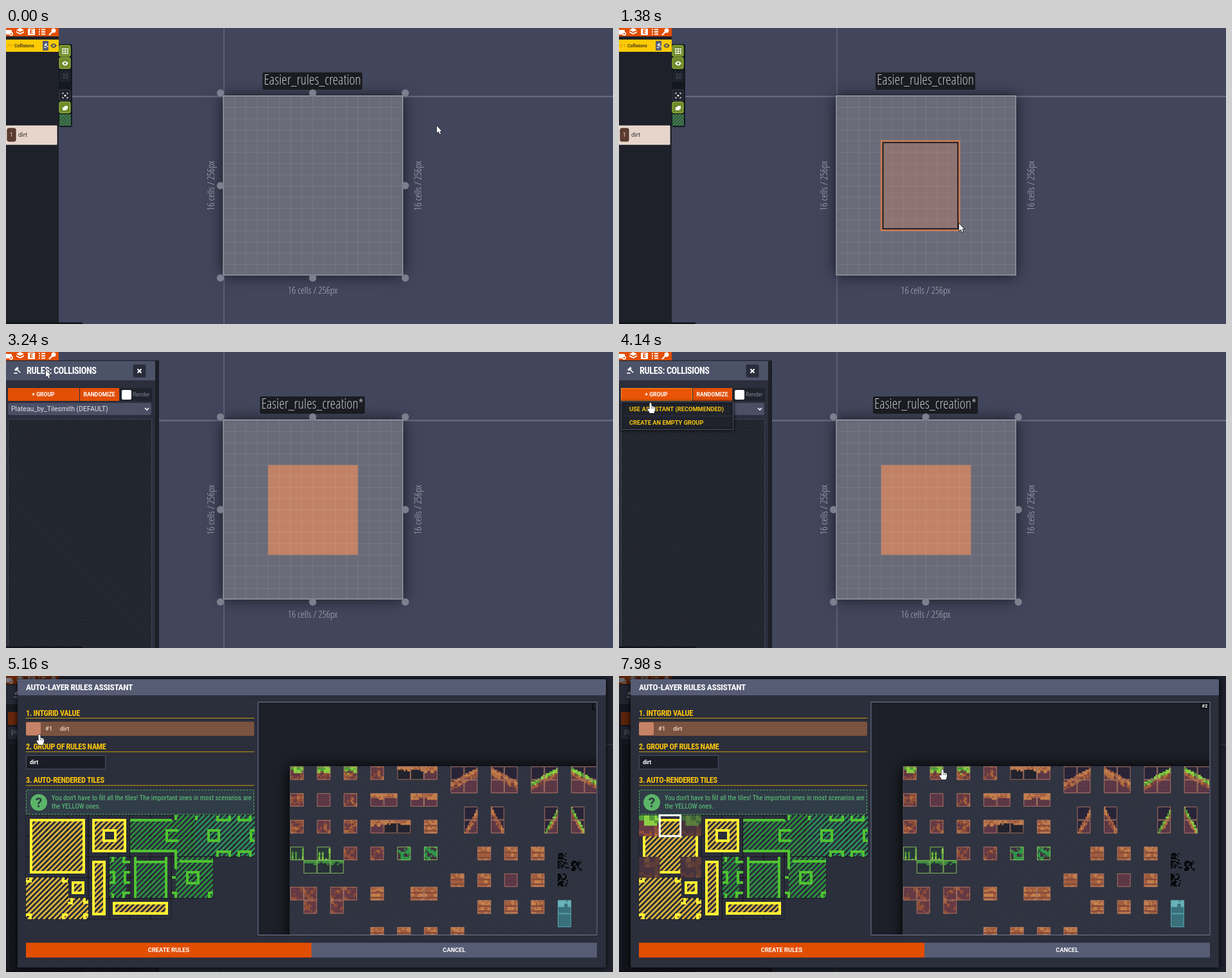
Animation, 944 px wide and 460 px high, one loop 8 s. Source, as an HTML page with a canvas:

```html
<!DOCTYPE html>
<html lang="en">
<head>
<meta charset="utf-8">
<title>Level editor</title>
<style>
html, body { margin: 0; width: 100%; height: 100%; overflow: hidden; background: #42465c }
canvas { display: block }
</style>
</head>
<body>
<canvas id="stage" width="944" height="460"></canvas>
<script>
const W = 944, H = 460, LOOP = 8000, STEP = 60;
const CELL = 279 / 16, LEFT = 338, TOP = 106;
const SLOT = 32.3, TILE = 20.8;
const screen = document.getElementById('stage').getContext('2d');
let ctx = screen;

// ---- drawing helpers ----
function box(x, y, w, h, fill, stroke, radius = 0) {
  ctx.beginPath();
  ctx.roundRect(x, y, w, h, radius);
  if (fill) { ctx.fillStyle = fill; ctx.fill(); }
  if (stroke) { ctx.strokeStyle = stroke; ctx.lineWidth = 1; ctx.stroke(); }
}
function line(path, color, width = 1) {
  ctx.strokeStyle = color;
  ctx.lineWidth = width;
  ctx.stroke(new Path2D(path));
}
function shape(path, color) {
  ctx.fillStyle = color;
  ctx.fill(new Path2D(path));
}
function dot(x, y, r, color) {
  ctx.beginPath();
  ctx.arc(x, y, r, 0, 7);
  ctx.fillStyle = color;
  ctx.fill();
}
function at(x, y, draw, angle = 0) {
  ctx.save();
  ctx.translate(x, y);
  ctx.rotate(angle);
  draw();
  ctx.restore();
}
function hatch(x, y, w, h, color, gap = 6, width = 1, slope = -1) {
  ctx.save();
  ctx.beginPath();
  ctx.rect(x, y, w, h);
  ctx.clip();
  ctx.beginPath();
  const first = Math.floor((slope < 0 ? x + y : x - y - h) / gap) * gap;
  for (let k = first; k < first + w + h + 2 * gap; k += gap) {
    ctx.moveTo(k + slope * y, y);
    ctx.lineTo(k + slope * (y + h), y + h);
  }
  ctx.strokeStyle = color;
  ctx.lineWidth = width;
  ctx.stroke();
  ctx.restore();
}
function layer(draw) {
  const canvas = document.createElement('canvas');
  canvas.width = W;
  canvas.height = H;
  ctx = canvas.getContext('2d');
  draw();
  ctx = screen;
  return canvas;
}

// ---- text ----
const roboto = (size, weight = 400) => `${weight} ${size}px Roboto, sans-serif`;
const faces = {
  label: '"Open Sans Condensed Light", "Open Sans Condensed", "Open Sans"',
  ui: '"Roboto Condensed", Roboto'
};
const condensed = (face, size, weight) => `${weight} condensed ${size}px ${faces[face]}, sans-serif`;
// Use a smaller size where no condensed face is installed.
const shrink = (face, plain) => {
  const widthOf = font => { ctx.font = font; return ctx.measureText('Rules creation').width; };
  return widthOf(condensed(face, 40, 400)) < widthOf(`40px "${plain}", sans-serif`) * .97 ? 1 : .84;
};
const scale = { label: shrink('label', 'Open Sans'), ui: shrink('ui', 'Roboto') };
const narrow = (face, size, weight) => condensed(face, size * scale[face], weight);

function text(s, x, y, font, color, align = 'left', spacing = 0) {
  ctx.font = font;
  ctx.letterSpacing = spacing + 'px';
  ctx.textAlign = align;
  ctx.textBaseline = 'middle';
  ctx.fillStyle = color;
  ctx.fillText(s, x, y);
}
const heading = (s, x, y, size, color) => text(s, x, y, narrow('ui', size, 600), color, 'left', -.03 * size);

// ---- small icons ----
const gavel = (x, y, size, color) => at(x, y, () => {
  ctx.scale(size, size);
  box(-4, -5, 4, 8, color);
  box(0, -2, 8, 2, color);
  ctx.rotate(-Math.PI / 4);
  box(-6, 5, 7, 2, color);
}, Math.PI / 4);

function eye(x, y, color, pupil) {
  at(x, y, () => {
    shape('M-5 0Q0 -7 5 0Q0 7 -5 0Z', color);
    dot(0, 0, 1.8, pupil);
  });
}

// ---- world ----
const world = layer(() => {
  box(0, 0, W, H, '#42465c');
  line('M339 0V460', '#74788a');
  line('M82 106.5H944', '#6d7184', 2);
  ctx.shadowColor = 'rgba(0,0,0,.7)';
  ctx.shadowBlur = 22;
  box(LEFT, TOP, 279, 278, '#696b79');
  ctx.shadowBlur = 0;
  for (let i = 1; i < 16; i++) {
    const d = i * CELL;
    line(`M${LEFT + d} ${TOP}V384M${LEFT} ${TOP + d}H617`, 'rgba(255,255,255,.09)');
  }
  box(LEFT, TOP - .5, 279, 278.5, null, '#b9bac3');
  const size = '16 cells / 256px', font = narrow('label', 15.3, 300), color = '#b0b2bc';
  text(size, 477, 409, font, color, 'center');
  for (const x of [320, 642]) at(x, 245, () => text(size, 0, 0, font, color, 'center'), -Math.PI / 2);
});

function toolbar() {
  box(0, 0, 82, 13, '#e24e06');
  box(-1, 3, 10, 7, '#fff', null, 1);
  dot(8, 9, 3, '#fff');
  dot(8, 9, 1.3, '#e24e06');
  shape('M22 0L28 3L22 6L16 3ZM16 5L22 8L28 5V7L22 10L16 7Z', '#fff');
  box(34, 1, 11, 10, '#fff', null, 1);
  text('E', 39.5, 6.5, roboto(9, 900), '#e24e06', 'center');
  line('M51 2.5H53M55 2.5H61M51 6H53M55 6H61M51 9.5H53M55 9.5H61', '#fff', 2);
  line('M67 11L73 5', '#fff', 2.4);
  dot(74, 4, 3.5, '#fff');
}

const sidebar = layer(() => {
  box(0, 0, 82, H, '#1e2129');
  toolbar();
  box(0, 18, 82, 19, '#fecb05');
  text('F1', 2, 27.5, roboto(7.5), '#dc8f0b');
  text('Collisions', 13, 27.5, roboto(7, 500), '#2b2615');
  box(57, 20, 9, 15, '#565c75', null, 1);
  gavel(62, 27, .55, '#fff');
  eye(74, 27.5, '#4b4e62', '#fecb05');
  box(0, 152, 79, 29, '#e7d4ca', '#f4e9e2');
  box(2, 156, 13, 20, '#5c3b30', '#41291f', 2);
  text('1', 8.5, 166.5, roboto(8.5), '#eed5c8', 'center');
  text('dirt', 19, 166.5, roboto(9.5), '#33302f');

  box(82, 25, 21, 129, '#141820', null, 3);
  for (const y of [27, 46, 115]) box(83, y, 17, 17, '#6f8a2c', '#a8cc3c', 2);
  box(83, 96, 17, 17, '#20232c', '#3a3e4c', 2);
  hatch(83, 66, 17, 18, '#2e323b', 5, 1.5);
  box(83, 134, 18, 18, '#2f5b3e');
  hatch(83, 134, 18, 18, '#4a8054', 5, 1.5);
  line('M87 32.5H97M87 36H97M87 39.5H97M88 31V41M92 31V41M96 31V41', '#fff');
  eye(92, 55, '#fff', '#6f8a2c');
  line('M88 72H97M88 75H97M88 78H97', '#4b505c');
  line('M88 103V101H90M94 101H96V103M96 107V109H94M90 109H88V107', '#fff');
  dot(92, 105, 1.6, '#fff');
  shape('M88 128V123H91V121H96V126H94V128Z', '#fff');
});

// ---- rules panel ----
const panel = layer(() => {
  box(0, 13, 238, 447, '#1c1f28');
  toolbar();
  box(0, 14, 232, 446, '#2b2e3b');
  box(0, 14, 232, 30, '#4c5268');
  gavel(17, 28, .8, '#fff');
  heading('RULES: COLLISIONS', 32, 30, 14.3, '#fff');
  box(197.5, 19.5, 20, 20, '#292c39', '#3c4155', 2);
  line('M204.5 26.5L210.5 32.5M210.5 26.5L204.5 32.5', '#fff', 2);
  box(3, 56, 111, 20, '#e24e06');
  box(115, 56, 61, 20, '#e24e06');
  text('RANDOMIZE', 145, 66.5, roboto(8.6, 600), '#fff', 'center');
  box(177, 56, 50, 20, '#20232c');
  box(180, 59, 15, 15, '#fff', null, 2);
  text('Render', 197, 66.5, roboto(8.5), '#7c8194');
  box(3, 79, 223, 19, '#4a4f65', null, 2);
  text('Plateau_by_Tilesmith (DEFAULT)', 8, 88.5, roboto(10.5), '#dfe1ea');
  line('M216 87L219 90L222 87', '#fff', 1.6);
  box(3.5, 104.5, 223, 360, '#1c1f26', '#3d4254');
  hatch(4, 105, 222, 355, '#2d323c', 5, 1.4, 1);
});

// ---- tiles: each kind maps a pixel and its noise to a colour ----
const noise = (i, j, k) => {
  const v = Math.sin(i * 12.9898 + j * 78.233 + k * 37.719) * 43758.5453;
  return v - Math.floor(v);
};
// Noise in small clumps, so that tiles look like pebbles.
const clumps = (i, j, k) => .65 * noise(i >> 1, j >> 1, k) + .35 * noise(i, j, k);
const NIGHT = '#292438', PLUM = '#5e3846';
const soil = h => h > .72 ? '#b8703f' : h > .42 ? '#934f37' : '#673a44';
const clay = h => h > .5 ? '#c8804c' : '#a65e3d';
const leaf = h => h > .5 ? '#8fd443' : '#539f38';
const slope = (rising, edge) => (i, j, h, w, tall) => {
  const reach = (rising ? w - i : i) / w * tall * (tall > w ? .9 : .55);
  return j < reach ? NIGHT : j < reach + 2.5 ? edge(h) : j < reach + 5 ? soil(h + .2) : PLUM;
};
const kinds = {
  dirt: (i, j, h) => soil(h),
  root: (i, j, h) => soil(h - .2),
  plain: () => PLUM,
  grass: (i, j, h) => j < 1.5 + h * 3 ? leaf(h) : soil(h),
  ledge: (i, j, h) => j < 2 + h * 2 ? clay(h) : PLUM,
  gap: (i, j, h) => j < 1.5 + h ? clay(h) : '#22232d',
  rise: slope(true, clay), fall: slope(false, clay),
  greenRise: slope(true, leaf), greenFall: slope(false, leaf),
  plant: (i, j, h) => noise(i, 3, 1) * 7 < j && i % 2 ? leaf(h) : '#28383a',
  moss: (i, j, h) => j < h * 3 ? '#3d8f3c' : '#283039',
  bush: (i, j, h) => h > .55 ? '#2f9a48' : '#43303f',
  stone: (i, j, h) => j == 3 || j == 6 ? '#8a4d3b' : clay(h),
  ice: (i, j, h) => j < 4 && h > .4 ? '#6cb9bd' : '#3a737d'
};
function paint(kind, x, y, size, cols = 1, rows = 1, seed = 0) {
  const px = size / 8;
  for (let i = 0; i < cols * 8; i++)
    for (let j = 0; j < rows * 8; j++) {
      ctx.fillStyle = kinds[kind](i, j, clumps(i, j, seed), cols * 8, rows * 8);
      ctx.fillRect(x + i * px, y + j * px, px + .3, px + .3);
    }
}
function place(kind, row, columns, cols = 1, rows = 1, border = '#a27262') {
  for (const c of columns) {
    const x = 442 + c * TILE, y = 140.5 + row * TILE;
    paint(kind, x, y, TILE, cols, rows, c + row);
    for (let i = 0; i < cols; i++)
      for (let j = 0; j < rows; j++)
        box(x + i * TILE + .5, y + j * TILE + .5, TILE - 1, TILE - 1, null, border);
  }
}
function tileset() {
  box(392, 41, 527, 361, '#1d2029');
  ctx.save();
  ctx.beginPath();
  ctx.rect(393, 42, 525, 360);
  ctx.clip();
  ctx.shadowColor = '#000';
  ctx.shadowBlur = 20;
  box(441, 140, 520, 300, '#2d303d');
  ctx.shadowBlur = 0;
  hatch(441, 140, 478, 262, '#363b49', 5, 1.2, 1);
  const green = '#86b95b';
  place('grass', 0, [0, 2, 4]);
  place('dirt', 0, [6]);
  place('gap', 0, [8, 9]);
  place('ledge', 0, [10]);
  place('rise', 0, [12], 2, 2);
  place('fall', 0, [15], 2, 2);
  place('greenRise', 0, [18], 2, 2);
  place('greenFall', 0, [21], 2, 2);
  place('dirt', 2, [0, 4]);
  place('plain', 2, [2]);
  place('ledge', 2, [6, 7, 9, 10]);
  place('rise', 3, [13], 1, 2);
  place('fall', 3, [15], 1, 2);
  place('greenRise', 3, [19], 1, 2);
  place('greenFall', 3, [21], 1, 2);
  place('dirt', 4, [0, 2, 4]);
  place('ledge', 4, [6]);
  place('gap', 4, [7, 8]);
  place('stone', 4, [10]);
  place('plant', 6, [0, 2], 1, 1, green);
  place('root', 6, [4, 6]);
  place('bush', 6, [8, 10], 1, 1, green);
  place('stone', 6, [14, 16, 18]);
  place('moss', 7, [1, 2, 3], 1, 1, green);
  place('stone', 8, [12, 14, 18]);
  place('plain', 8, [16]);
  place('root', 9, [0, 1, 3, 4]);
  place('stone', 9, [6, 9, 10]);
  place('root', 10, [1, 3]);
  place('stone', 10, [14, 16, 18]);
  place('ice', 10, [20], 1, 2, '#58a3aa');
  place('stone', 12, [6, 8, 10, 12]);
  ctx.fillStyle = '#07080b';
  for (const [x, y, h] of [[858, 275, 24], [879, 287, 16], [858, 307, 20]])
    for (let i = 0; i < 10; i++)
      for (let j = 0; j < h / 2; j++)
        if (noise(i, j, x + y) > .15 + i * .1) ctx.fillRect(x + i * 2, y + j * 2, 2, 2);
  ctx.restore();
  box(392, 40.5, 527, 362, null, '#757b91');
}

// ---- rule slots ----
function ruleSlots() {
  ctx.strokeStyle = 'rgba(0,0,0,.3)';
  ctx.lineWidth = 1;
  for (let r = 0; r < 5; r++)
    for (let c = 0; c < (r < 2 ? 11 : r < 4 ? 9 : 7); c++)
      ctx.strokeRect(31 + c * SLOT, 216.5 + r * SLOT, SLOT, SLOT);
  const yellow = '#fff133', green = '#50c331', gap = SLOT / 4;
  for (const area of [[39, 224, 82, 81], [136, 224, 49, 48], [136, 289, 17, 81], [104, 321, 16, 16],
    [168, 353, 82, 16], [31, 313, 66, 65], [97, 345, 31, 33]]) hatch(...area, '#dfb83b', gap, 2.7);
  for (const area of [[193, 224, 71, 50], [264, 216, 30, 64], [161, 281, 26, 64], [201, 289, 48, 56],
    [264, 281, 58, 64]]) hatch(...area, '#2d9240', gap, 2.7);
  hatch(294, 216, 93, 64, '#2b9159', gap, 2.7);
  box(152, 240, 18, 16, '#2b2e3b');
  line('M39 224H121V305H39ZM136 224H185V272H136ZM152 240H170V256H152ZM136 289H153V370H136Z' +
    'M104 321H120V337H104ZM168 353H250V369H168Z', yellow, 4);
  line('M31 319H38V313M89 313V319H96M31 371H38V378M89 378V371H96M96 353H102V345' +
    'M122 345V352H128M122 378V371H128', yellow, 4);
  line('M193 224H258M193 272H264V281M268 240H250V256H268M315 240H331V256H315ZM264 216V224M296 217V224' +
    'M329 217V224H348V217M362 217V224H380V217M387 240H381V256H387M329 281V273H348V281M362 281V273H380V281', green, 4);
  line('M166 281V289M166 345V338M183 281V289H193M183 345V337H193M161 305H168V321H161M193 305H185V321H193' +
    'M201 281V345M249 281V345M201 289H249M258 337H264V345M264 272V300M282 305H299V322H282Z' +
    'M258 313H264M270 288H322M316 345V337H322', green, 4);
}

const dialog = layer(() => {
  ctx.shadowColor = '#000';
  ctx.shadowBlur = 8;
  box(18, 5, 915, 448, '#2b2e3b', null, 2);
  ctx.shadowBlur = 0;
  box(18, 5, 915, 25, '#565c74', null, 2);
  heading('AUTO-LAYER RULES ASSISTANT', 31, 18.5, 13.5, '#fff');
  ['1. INTGRID VALUE', '2. GROUP OF RULES NAME', '3. AUTO-RENDERED TILES'].forEach((title, i) => {
    heading(title, 31, 58 + i * 52.3, 12.3, '#fbc50b');
    line(`M31 ${65.5 + i * 52.3}H386`, '#c99f10');
  });
  box(31, 71, 355, 22, '#79533f', null, 2);
  box(31, 72, 23, 20, '#c68368', null, 2);
  text('#1', 61, 82, roboto(9.5, 500), '#f0d9ce');
  text('dirt', 84, 82, roboto(9.5, 500), '#f0d9ce');
  box(31.5, 123.5, 123, 21, '#1b1e27', '#4b5064');
  text('dirt', 37, 134.5, roboto(8.5, 700), '#fff');
  ctx.setLineDash([3, 2]);
  box(31.5, 177, 354, 38, '#303c47', '#53b565', 2);
  ctx.setLineDash([]);
  dot(51, 196.5, 13, '#5bb568');
  text('?', 51, 197.5, roboto(21, 700), '#2e3c43', 'center');
  const note = narrow('ui', 10.6, 400);
  text("You don't have to fill all the tiles! The important ones in most scenarios are", 71, 190, note, '#62cc7c');
  text('the YELLOW ones.', 71, 202.5, note, '#62cc7c');
  ruleSlots();
  tileset();
  box(31, 414.5, 444, 23, '#e24e00');
  box(475, 414.5, 444, 23, '#565c74');
  text('CREATE RULES', 253, 426, roboto(9.3, 600), '#fff', 'center');
  text('CANCEL', 697, 426, roboto(9.3, 600), '#fff', 'center');
});

// ---- motion: time, x, y of the pointer tip ----
const route = [
  [0, 670, 152], [660, 398, 186], [840, 398, 186], [960, 416, 190], [1380, 529, 304], [1620, 540, 305],
  [1680, 540, 305], [2460, 62, 27], [2520, 61, 25], [2700, 62, 28], [3240, 62, 28], [3660, 50, 62],
  [3840, 50, 62], [4140, 49, 79], [4620, 52, 91], [5160, 52, 91], [5280, 57, 104], [5460, 57, 104],
  [5820, 268, 212], [6240, 47, 235], [6300, 47, 235], [6780, 441, 157], [7020, 450, 148], [7080, 450, 148],
  [7380, 77, 232], [7440, 77, 232], [7920, 502, 146], [7980, 503, 145], [LOOP, 503, 145]
];
function pointerAt(t) {
  const n = route.findIndex(key => key[0] > t);
  const [t0, x0, y0] = route[n - 1], [t1, x1, y1] = route[n];
  const u = (t - t0) / (t1 - t0), e = u * u * (3 - 2 * u);
  return [x0 + (x1 - x0) * e, y0 + (y1 - y0) * e];
}
function drawPointer(x, y, hand) {
  at(x, y, () => {
    const path = hand
      ? 'M-1.5 1Q0 -1 1.5 1V5L6 6.2Q7.5 7 7 11L5.5 16H-1L-4.5 10.5Q-4.5 8 -1.5 9.8Z'
      : 'M0 0V11L2.6 8.8L4.5 13L6.2 12.2L4.4 8.2H7.6Z';
    line(path, '#1b1c22', 1.4);
    shape(path, '#fff');
    if (hand) line('M1.5 6V9M3.6 6.5V9M5.4 7V9', '#777');
  });
}

function drawLevel(t, x, y) {
  ctx.drawImage(world, 0, 0);
  const painted = t >= 1680;
  const title = 'Easier_rules_creation' + (painted ? '*' : ''), font = narrow('label', 21.8, 300);
  ctx.font = font;
  ctx.letterSpacing = '0px';
  const w = ctx.measureText(title).width + 4;
  box(476.5 - w / 2, 69, w, 27, '#1b1c21', null, 2);
  text(title, 476.5, 82.5, font, '#c4c6cd', 'center');
  if (painted) {
    box(LEFT + 4 * CELL, TOP + 4 * CELL, 8 * CELL, 8 * CELL, '#c18266');
    for (let i = 1; i < 8; i++) {
      const d = (4 + i) * CELL;
      line(`M${LEFT + d} 176V315M408 ${TOP + d}H547`, 'rgba(255,255,255,.1)');
    }
  }
  const col = Math.floor((x - LEFT) / CELL), row = Math.floor((y - TOP) / CELL);
  if (col >= 0 && col < 16 && row >= 0 && row < 16) {
    const dragging = t >= 960 && !painted, c = dragging ? 4 : col, r = dragging ? 4 : row;
    const left = LEFT + c * CELL, top = TOP + r * CELL - .5;
    const wide = (col - c + 1) * CELL, high = (row - r + 1) * CELL;
    box(left, top, wide, high, 'rgba(205,130,100,.36)');
    ctx.lineWidth = 2.4;
    ctx.strokeStyle = '#2b2326';
    ctx.strokeRect(left + 2.6, top + 2.6, wide - 5.2, high - 5.2);
    ctx.strokeStyle = '#cd7f55';
    ctx.strokeRect(left + .3, top + .3, wide - .6, high - .6);
  } else {
    for (const hx of [333.5, 477, 621])
      for (const hy of [101, 245, 388.5])
        if (hx != 477 || hy != 245) dot(hx, hy, 5.7, '#7c7f8e');
  }
}

function drawPanel(t, y) {
  const slide = t < 2940 ? -90 : 0;
  at(slide, 0, () => {
    ctx.drawImage(panel, 0, 0);
    if (t < 5160 && y > 54) box(3, 56, 111, 20, '#ea5406');
    text('+ GROUP', 58, 66.5, roboto(8.6, 600), '#fff', 'center');
  });
  if (t < 3840 || t >= 5160) return;
  ctx.setLineDash([1, 1]);
  box(3.5, 56.5, 110, 19, null, '#ffc83c');
  ctx.setLineDash([]);
  ctx.shadowColor = '#000';
  ctx.shadowBlur = 5;
  box(3.5, 77.5, 174, 43, '#20232c', '#4d5266');
  ctx.shadowBlur = 0;
  line('M4 99.5H177', '#2e323e');
  text('USE ASSISTANT (RECOMMENDED)', 16, 89, roboto(9.3, 600), '#f7c60e');
  text('CREATE AN EMPTY GROUP', 16, 110, roboto(9.3, 600), '#f7c60e');
}

function fillSlot(c, r, alpha) {
  const x = 31 + c * SLOT, y = 216.5 + r * SLOT;
  box(x, y, SLOT, SLOT, '#2b2e3b');
  ctx.globalAlpha = alpha;
  paint(r ? 'dirt' : 'grass', x, y, SLOT);
  ctx.globalAlpha = 1;
}
function drawDialog(t, x, y) {
  box(0, 0, W, H, `rgba(8,9,14,${t < 5220 ? .56 : .62})`);
  ctx.drawImage(dialog, 0, 0);
  if (t >= 7020) {
    fillSlot(0, 0, 1);
    fillSlot(2, 0, .45);
    fillSlot(0, 2, .45);
    fillSlot(2, 2, .45);
  }
  const selected = t >= 7440 ? 1 : t >= 6300 && t < 7020 ? 0 : -1;
  if (selected >= 0) {
    ctx.strokeStyle = '#fff';
    ctx.lineWidth = 3;
    ctx.strokeRect(31 + selected * SLOT, 216.5, SLOT, SLOT);
  }
  if (x >= 440) {
    const id = Math.max(0, Math.floor((x - 442) / TILE)) + 25 * Math.floor((y - 140) / TILE);
    box(904, 42, 14, 10, '#14161c');
    text('#' + id, 911, 47, roboto(7.5, 600), '#fff', 'center');
  } else {
    line('M912.5 44V51.5H916', '#0a0b0f', 2);
  }
}

function frame(now) {
  const t = Math.floor(now % LOOP / STEP) * STEP;
  const [x, y] = pointerAt(t);
  drawLevel(t, x, y);
  if (t < 2940) ctx.drawImage(sidebar, 0, 0);
  if (t >= 2880) drawPanel(t, y);
  box(0, 457.5, 119, 3, '#111319');
  if (t >= 5160) drawDialog(t, x, y);
  drawPointer(x, y, t >= 2880 ? y > 54 : t >= 2460);
  requestAnimationFrame(() => frame(performance.now()));
}
frame(performance.now());
</script>
</body>
</html>
```
